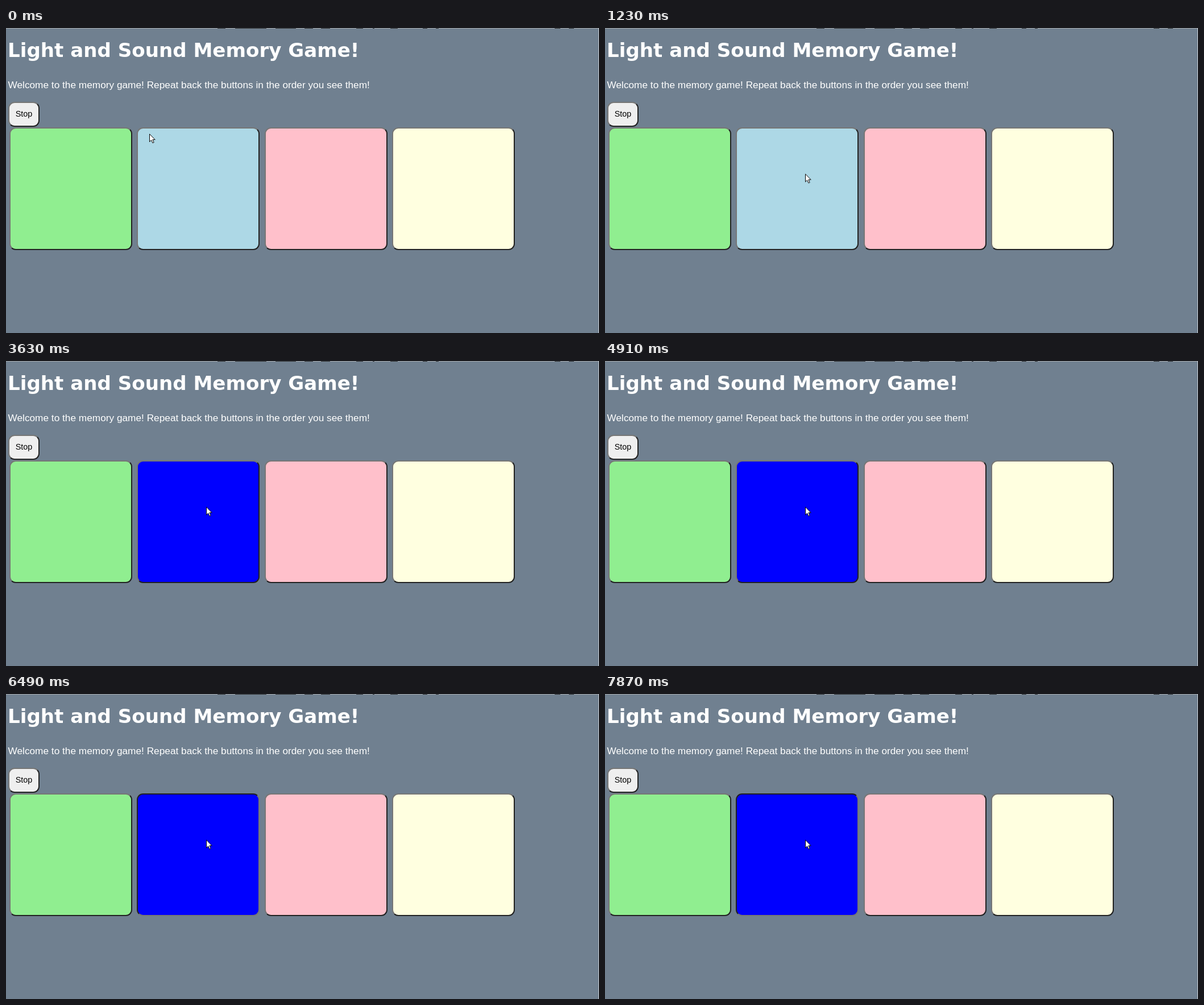
An HTML page that plays this animation: 1043x537 px, repeating every 8 s.

```html
<!DOCTYPE html>
<html lang="en">
<head>
<meta charset="utf-8">
<title>Memory Game</title>
<style>
  html, body { margin: 0; width: 100%; height: 100%; overflow: hidden; background: #708090; }
  body { position: relative; }
  body > * { position: absolute; margin: 0; white-space: nowrap; box-sizing: border-box; }
  h1 { left: 3px; top: 19px; font: bold 34.1px/40px "DejaVu Sans", sans-serif; color: #fff; }
  p { left: 3.5px; top: 90px; font: 17.25px/20px "Liberation Sans", Arial, sans-serif; color: #fff; }
  .button { border: 2px solid; border-color: #767676 #222 #222 #767676; border-radius: 11px; }
  .stop { left: 4px; top: 130px; width: 55px; height: 44px; background: #efefef; color: #000;
          font: 14.4px/38px "Liberation Sans", Arial, sans-serif; text-align: center; }
  .tile { top: 175px; width: 216px; height: 216px; }
  .edge { left: 0; top: 0; width: 1043px; height: 537px; }
  #cursor { left: 0; top: 0; width: 12px; height: 18px; }
</style>
</head>
<body>
<h1>Light and Sound Memory Game!</h1>
<p>Welcome to the memory game! Repeat back the buttons in the order you see them!</p>
<div class="button stop">Stop</div>
<div class="button tile" style="left:6px;background:lightgreen"></div>
<div class="button tile" id="blue" style="left:230px;background:lightblue"></div>
<div class="button tile" style="left:455px;background:pink"></div>
<div class="button tile" style="left:679px;background:lightyellow"></div>
<svg class="edge" viewBox="0 0 1043 537">
  <path d="M0 .5H1043" stroke="#a4a9ae"/>
  <path d="M372 .5h14m17 0h55m16 0h36m15 0h15m14 0h16m46 0h12m17 0h3m28 0h13m44 0h8m15 0h5m204 0h10m15 0h9" stroke="#333"/>
  <path d="M1042.5 0V537" stroke="#c3c9cf"/>
</svg>
<svg id="cursor" viewBox="0 0 12 18">
  <path d="M.5 .7V14.3L3.6 11.4L5.9 16.4L8.2 15.4L5.9 10.6H10.2Z" fill="#fff" stroke="#000"/>
</svg>
<script>
  const LOOP = 8000;

  // Each step is [time, value]; a value holds until the next step.
  function hold(id, property, steps) {
    const last = steps[steps.length - 1][1];
    const frames = [...steps, [LOOP, last]].map(([time, value]) => ({
      offset: time / LOOP, [property]: value, easing: "steps(1, end)"
    }));
    document.getElementById(id).animate(frames, { duration: LOOP, iterations: Infinity });
  }

  const at = (time, x, y) => [time, `translate(${x}px, ${y}px)`];
  const raised = "#767676 #222 #222 #767676";
  const pressed = "#222 #767676 #767676 #222";

  const toggles = [0, 260, 1230, 2130, 2580, 3630, 4610, 4910, 5910, 6490, 7320, 7870];
  hold("blue", "backgroundColor", toggles.map((time, i) => [time, i % 2 ? "blue" : "lightblue"]));

  const presses = [0, 2130, 2580, 6490, 7320, 7870];
  hold("blue", "borderColor", presses.map((time, i) => [time, i % 2 ? pressed : raised]));

  hold("cursor", "transform", [
    at(0, 252, 186), at(130, 264, 187), at(260, 284, 186), at(520, 351, 194),
    at(670, 354, 212), at(790, 351, 230), at(940, 352, 256.5)
  ]);
</script>
</body>
</html>
```
